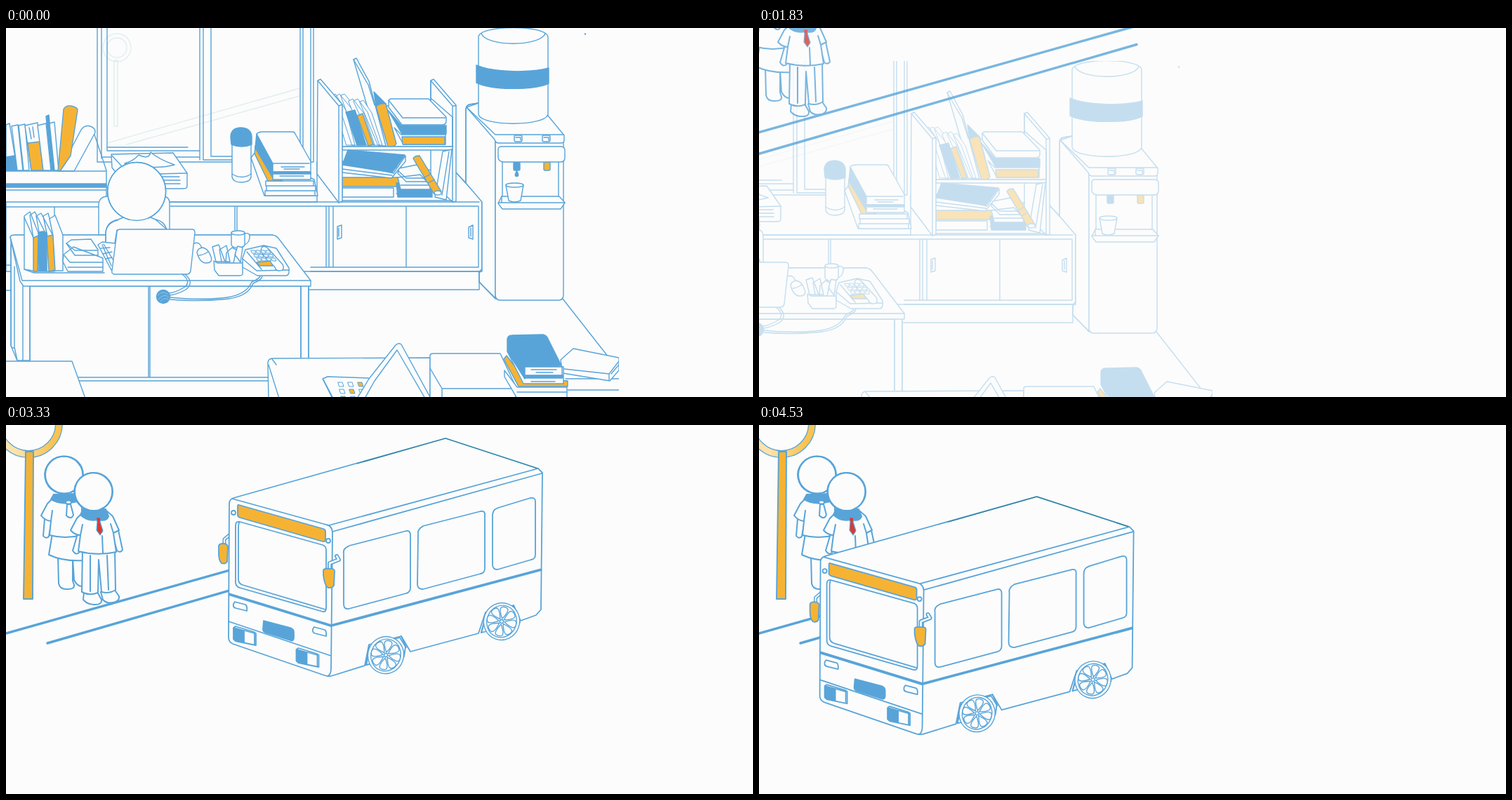
These frames come from a looping animation (1064x526 px, 4730 ms). An HTML page:

```html
<!DOCTYPE html>
<html lang="en">
<head>
<meta charset="utf-8">
<title>Office to bus stop</title>
<style>
html, body { margin: 0; width: 100%; height: 100%; overflow: hidden; background: #fcfcfc; }
svg { display: block; width: 100%; height: 100%; }
path, circle, ellipse, rect { fill: #fcfcfc; stroke: #58a4d9; stroke-width: 1.4; stroke-linejoin: round; stroke-linecap: round; }
.l { fill: none; }
.b { fill: #58a4d9; }
.o { fill: #f6b333; }
.r { fill: #d93a32; }
.pale > * { fill: none; stroke: #e0efee; }
.thin > * { stroke-width: 1; }
.bold > * { stroke-width: 2; }
.bus > * { stroke-width: 1.8; }
.bus > .stripe { stroke-width: 3.8; stroke-linecap: butt; fill: none; }
.road { fill: none; stroke-width: 3.4; }
</style>
</head>
<body>
<svg viewBox="0 0 1064 526">
<defs>
  <clipPath id="page"><rect width="873" height="526"/></clipPath>
  <clipPath id="ahead"><rect id="aheadBox" width="1064" height="526"/></clipPath>
  <linearGradient id="glow"><stop offset=".3" stop-color="#fde2ac"/><stop offset=".9" stop-color="#f8c352"/></linearGradient>
  <g id="wheel"></g>
</defs>

<g id="office"><g clip-path="url(#page)">
  <!-- window -->
  <g class="pale">
    <circle cx="158" cy="28" r="20"/><circle cx="158" cy="28" r="14"/>
    <path d="M154 46V140H159V46ZM144 164 418 86M172 166 418 97"/>
  </g>
  <path class="l" d="M130 0V191M136 0V186M144 0V175M276 0V188M281 0V188M292 0V183M419 0V190M423 0V193M434 0V193M438 0V191M144 170H259M144 175H276M136 184H276M130 191H322M292 183H322M281 188H322M425 191H438"/>
  <!-- counter -->
  <path d="M443 191 640 205 675 243Q678 246 678 251V341Q678 347 672 347H0V248H443Z" stroke="none"/>
  <path class="l" d="M234 248H674M234 254H672M641 206 675 242Q678 246 678 251V341Q678 347 672 347H434M673 254V341H434M674 347V373H432M69 255V294M0 255H133M326 255V288M329 255V288M456 255V341M460 255V341M466 255V341M570 255V341M0 338H8M0 374H8"/>
  <path d="M472 283 478 281V299L472 301ZM474 285V297M665 281 659 284V299L665 301ZM662 285V297"/>

  <!-- far left shelf -->
  <path d="M0 138 5 136 16 203H0Z"/>
  <path class="b" d="M0 184 12 182 15 203H0Z"/>
  <path d="M8 140 17 138 24 203H16ZM18 139 27 137 33 203H25Z"/>
  <path d="M27 139 45 135 53 203H36Z"/><path class="o" d="M31 164 48 162 53 203H36Z"/>
  <path class="l" d="M33 142 36 158M38 141 40 156"/>
  <path d="M45 139 57 136 64 203H53Z"/><path class="b" d="M57 126 61 124 69 203H65Z"/>
  <path d="M62 136 69 134 75 203H69Z"/>
  <path d="M107 145Q112 138 120 140 128 143 127 149L97 204H76Z"/>
  <path class="o" d="M82 116Q84 110 93 111 102 113 102 117L92 182 77 204H74Z"/>
  <path class="l" d="M126 152 143 203M0 204H143V248M0 231H143"/>
  <path class="b" d="M0 222H143V227H0Z" stroke="none"/>

  <!-- tissue box -->
  <path d="M150 180 238 178 258 207V225Q258 229 253 229H175L151 199Z"/>
  <path class="l" d="M151 182 176 209 258 207M176 209V229M222 212H247M222 217H248M222 222H248"/>
  <path d="M169 193Q181 190 189 181 204 188 206 177 217 187 240 195 211 203 169 193Z"/>

  <!-- flask -->
  <path d="M322 164V212Q323 220 336 220 349 219 349 212V164Z"/>
  <path class="l" d="M322 208Q336 217 349 208"/>
  <path class="b" d="M320 156Q320 142 335 142 350 143 350 156V166Q336 172 321 166Z"/>

  <!-- counter book pile -->
  <path d="M349 185 355 177 439 216 444 239H368Z"/>
  <path d="M370 218H438V225H370ZM371 225H441V232H371ZM369 232H440V239H369Z"/>
  <path class="o" d="M355 168 381 210 394 218H373L354 179Z"/>
  <path class="b" d="M357 151 382 193V217L355 171Z"/>
  <path d="M357 151Q360 148 365 148H408Q411 148 412 151L434 190V216H380V193Z"/>
  <path class="l" d="M380 193H432M382 205H432M392 198H425M390 211H424M396 201H418"/>
  <path class="b" d="M380 205H434V208H380Z"/>

  <!-- bookcase -->
  <path d="M605 75 609 73 641 110V247L636 248 605 218Z"/>
  <path class="l" d="M605 75 636 111H641M636 111V248M479 246H636"/>
  <path d="M479 111H605V100L636 127V169H479Z" stroke="none"/>
  <path class="l" d="M605 75V102M636 127V169"/>
  <path d="M495 45 499 43 517 76 541 168H531Z"/><path class="l" d="M495 45 516 81 525 110"/>
  <g class="thin">
    <path d="M464 98 469 94 484 117 497 167H485ZM470 97 475 94 494 117 502 167H493ZM477 96 482 94 499 115 511 167H502Z"/>
    <path d="M488 104 494 101 510 122 525 167H513ZM495 104 501 101 515 120 532 167H524ZM504 105 509 103 521 121 536 167H530Z"/>
  </g>
  <path class="b" d="M484 120 497 117 513 167H500Z"/><path class="o" d="M500 125 508 122 523 166 516 168Z"/>
  <path class="b" d="M524 91 541 108 527 112Z"/>
  <path class="o" d="M527 112Q532 107 541 108L556 165Q553 170 544 169Z"/>
  <path class="b" d="M544 117 563 139H627V151H564Z"/>
  <path d="M545 103Q546 101 549 101H602L627 127V134Q626 138 621 138H564L545 113Z"/>
  <path class="l" d="M545 103 565 128H626"/>
  <path d="M553 142 563 152H626V166H566Z"/><path class="o" d="M564 155H625V166H565Z"/>
  <path d="M479 169H636V174H479Z"/>

  <path d="M622 176 635 173 627 245 611 241Z"/><path class="l" d="M631 176 621 238"/>
  <path d="M479 228H552V241H479Z"/><path class="o" d="M479 213H560V226H479Z"/>
  <path d="M479 190 552 207 569 182V190L549 214 479 206Z"/>
  <path class="b" d="M479 195 487 174 568 181 550 206Z"/>
  <path class="l" d="M479 201 550 210"/>
  <path class="b" d="M556 221H600L607 233V241H558Z"/>
  <path d="M558 213 590 209 604 224V230H562ZM560 200 585 195 600 212V219H570L558 207Z"/>
  <path class="l" d="M558 203 570 214H600M562 224H604M556 236H606"/>
  <path class="o" d="M580 186Q582 182 589 182L620 233Q618 238 610 237Z"/>
  <path d="M596 213 605 208M601 221 610 216" class="l"/>
  <ellipse cx="615" cy="235" rx="5" ry="3"/>
  <path d="M444 75 448 73 479 109V247L474 249 443 208Z"/><path class="l" d="M444 75 474 111V249M474 111 479 109"/>

  <!-- water cooler -->
  <path d="M673 107 660 109Q655 111 655 116V221L678 248V347L674 348V362L697 386V152L772 124Z" stroke="none"/>
  <path class="l" d="M673 107 660 109Q655 111 655 116V220M674 348V362L698 386"/>
  <path d="M697 158V380Q697 388 704 388H787Q794 388 794 380V158Z"/>
  <path d="M656 113 673 107 772 125 795 153V160Q795 164 790 164H702Q697 164 696 159Z"/>
  <path class="l" d="M656 113 697 152H794"/>
  <rect x="724" y="153" width="11" height="9" rx="2"/><rect x="764" y="153" width="11" height="9" rx="2"/>
  <path class="l" d="M726 156H733V160M766 156H773V160M707 190V242M787 190V240"/>
  <rect class="b" x="723" y="191" width="9" height="12" rx="2"/>
  <rect class="o" x="766" y="191" width="9" height="12" rx="2"/>
  <path d="M701 173Q701 169 706 169H791Q796 170 796 174V186Q795 191 790 191H708Q701 190 701 184Z"/>
  <path d="M706 240H788L796 249 790 258H707L701 250Z"/><path class="l" d="M701 249H796M706 240V249"/>
  <path d="M712 224 716 246Q724 250 733 246L737 224Z"/><ellipse cx="724.500" cy="224" rx="12.500" ry="3"/>
  <path id="drop" class="b" d="M727.500-4Q732 4 727.500 4 723 4 727.500-4Z" stroke="none"/>
  <path d="M673 13C673-5 772-5 772 13V122C772 141 673 141 673 122Z"/>
  <path class="l" d="M677 8C685 27 760 27 768 8"/>
  <path class="b" d="M670 53C695 64 748 64 773 57V79C750 90 690 88 670 78Z"/>
  <path class="l" d="M793 386 858 469"/>
  <circle class="b" cx="825" cy="8.500" r=".6" stroke="none"/>

  <!-- desk and sitter -->
  <path d="M132 295V251Q133 241 143 240H223Q233 240 233 250V295Z"/>
  <path d="M7 300V453L16 474H34V368H420V474H431V362L380 295H12Z" stroke="none"/>
  <path class="l" d="M7 309V453Q9 457 12 456M12 340V455L16 474M24 368V474M34 368V474M203 368V498M205 368V498M420 368V470M431 368V470M101 498H374M104 503H374"/>
  <path d="M6 298Q7 295 12 295H378Q385 295 389 301L434 360V368H25L20 361Z"/>
  <path class="l" d="M6 298 23 360H434"/>
  <path d="M142 308V292Q143 276 160 273L174 267H199L213 273 229 287 158 288 153 318Z" stroke="none"/>
  <path class="l" d="M142 308V292Q143 278 159 274M213 273Q225 275 229 287"/>
  <circle cx="186" cy="233" r="41.500" stroke="none"/>
  <path class="l" d="M175 273A41.500 41.500 0 1 1 203 271"/>

  <!-- desk books -->
  <path d="M26 268 34 262 48 297 44 347 26 344ZM34 267 41 262 56 292 58 347H46ZM43 268 50 264 67 296 69 347H57ZM53 268 60 264 69 296V347Z"/>
  <path class="o" d="M39 299 46 296 45 347H39Z"/><path class="b" d="M46 292Q52 288 58 292V346H47Z"/>
  <path class="o" d="M58 297 67 295 70 345 61 347Z"/>
  <path d="M62 272 70 267 81 295V346H70L67 296Z"/><path class="l" d="M26 270 39 299M26 344 40 349H140"/>
  <path d="M82 323 96 312 138 328V347H88L81 333ZM86 307 93 302 121 301 131 316V324H98Z"/>
  <path class="l" d="M86 307 98 317H130M83 324 91 334H138M88 341H138"/>

  <!-- laptop -->
  <path d="M131 309 137 305 156 307V347L150 345Z"/><path class="l" d="M137 309 150 339M139 308 154 333M135 314 148 313M138 322 151 319M142 329 151 327"/>
  <path d="M158 291Q158 287 163 287H266Q269 288 269 292L263 346Q262 351 257 351H154Q150 350 151 346Z"/>
  <path class="l" d="M251 351Q264 361 255 369 242 377 232 378M255 351Q269 363 256 373 243 380 233 381M363 352Q362 357 350 362 342 382 307 385 270 388 234 384M365 354Q364 359 352 364 344 385 307 387 270 390 234 387"/>
  <circle class="b" cx="224" cy="383" r="9.500"/>
  <path class="l" d="M216 381Q224 373 231 380M217 387Q225 377 232 384M220 390Q226 382 232 388" style="stroke:#9fcbe9;stroke-width:.8"/>

  <!-- desk tools -->
  <path class="l" d="M268 307Q276 304 279 314"/>
  <path d="M272 320Q273 314 280 313 288 314 292 326 295 335 285 335 276 335 272 320ZM275 324Q280 324 288 319"/>
  <path d="M340 293Q348 291 347 299 346 308 338 309"/>
  <path d="M321 292V309Q323 314 331 313 339 313 340 309V292Z"/><ellipse cx="330.500" cy="292" rx="9.500" ry="3"/>
  <path d="M294 312 303 309 312 333H299ZM304 316 314 310 319 333H307ZM314 320 322 313 328 316 324 335H313ZM326 323 330 311 337 313 334 334Z"/>
  <path d="M296 332 301 335H337V351Q336 353 333 353H303L297 345Z"/>
  <path d="M337 328 341 316 367 310 385 314 403 342V349Q402 353 398 353H358L337 341Z"/>
  <path class="l" d="M337 329 357 346 403 345M343 319 364 344"/>
  <path d="M364 313Q368 309 373 314L394 337Q398 346 389 346 384 346 383 341L369 326Q361 319 364 313Z"/>
  <g class="keys thin" data-x="349" data-y="317" data-skew="4"></g>
  <path class="o" d="M357 334 376 332 380 339H361Z"/>

  <!-- front desks -->
  <path d="M-2 475H94L113 528H-2Z"/>
  <path d="M373 480Q372 472 379 471L604 470V528H374Z"/><path class="l" d="M374 480 389 528M379 472 385 480"/>
  <path d="M451 500 458 497 516 499 540 528H465Z"/><path class="l" d="M452 501 466 528"/>
  <g class="keys thin" data-x="473" data-y="505" data-skew="2" data-gold="1"></g>
  <path d="M517 500 555 452Q559 448 563 451L605 528H500ZM525 503 557 459 597 528H511Z"/>
  <path d="M604 466Q605 464 609 464H704L726 511V528H604Z"/>
  <path class="l" d="M604 485 621 514H725M621 514V528M797 500H873M800 516H873"/>
  <path d="M790 473 808 457 873 470V488L860 503 793 492Z"/>
  <path class="l" d="M795 486 859 493 873 475M859 493V502M862 493 873 480"/>
  <path d="M710 488 728 512H799V528H728L710 497Z"/><path class="l" d="M728 519H799"/>
  <path class="o" d="M709 472 713 467 737 498 800 503V511H730Z"/>
  <path d="M737 483H794V507H737L715 463Z"/>
  <path class="b" d="M714 443Q715 438 721 438L765 437Q769 438 771 441L791 481 739 484V500L714 461Z"/>
  <path d="M739 483H792V496H739Z"/><path class="l" d="M748 487H784M755 491H779M748 504H782"/>
  <path class="b" d="M738 495H793V499H738Z"/>
</g></g>

<g id="street">
  <g clip-path="url(#ahead)"><path class="road" d="M0 297 597 128.500M59 311 603 153.500"/></g>
  <circle cx="32" cy="-2" r="43.500" class="l" style="stroke-width:11"/>
  <circle cx="32" cy="-2" r="43.500" style="fill:none;stroke:url(#glow);stroke-width:8.500"/>
  <path class="o" d="M28 38H39L38 248H25Z" style="stroke-width:1.900"/>
  <g class="bold">
    <!-- girl -->
    <path d="M74 186 75 226Q77 235 88 234 98 234 97 228L95 222V188ZM95 190 97 221Q102 231 110 230V190Z"/>
    <path d="M66 155 61 185Q82 195 112 193L108 158Z"/>
    <path d="M55 134 53 158Q57 163 61 159L65 136Z"/>
    <path d="M67 104 59 112 50 129Q55 136 64 137L62 157Q84 163 108 157V110L98 103Z"/>
    <path class="l" d="M64 137 66 122"/>
    <path class="b" d="M68 99 64 106Q78 115 102 109L102 98Z"/>
    <path d="M87 113 86 129Q93 136 96 128L92 113Z"/><ellipse cx="89" cy="110" rx="4" ry="2.500"/>
    <ellipse cx="83" cy="71" rx="27" ry="26.500" stroke="none"/>
    <path class="l" d="M76 97A27 26.500 0 1 1 93 95.500"/>
    <!-- boy -->
    <path d="M111 238 110 249Q117 257 127 256 137 256 136 249L130 238ZM135 238 138 249Q143 255 153 253 162 251 161 244L154 234Z"/>
    <path d="M109 178 108 238Q119 244 131 239L132 192 136 238Q147 241 156 235L155 178Z"/>
    <path class="l" d="M120 186V237M144 186 146 235"/>
    <path d="M102 155 95 179Q99 186 104 182L110 158ZM151 154 158 179Q163 183 166 178L160 150Z"/>
    <path d="M108 126 101 133 92 150Q98 157 106 157L103 180Q130 187 157 181L153 154 161 150 152 130 144 123Z"/>
    <path class="l" d="M106 157 109 142M153 154 149 141M137 158 138 183"/>
    <path class="b" d="M110 120 106 128Q116 138 131 135 144 138 146 130L142 120Z"/>
    <path class="r" d="M128 132H135L134 138 138 151 134 157 129 150 130 138Z" style="stroke-width:1.200"/>
    <ellipse cx="125" cy="95" rx="27" ry="27" stroke="none"/>
    <path class="l" d="M118 121.500A27 27 0 1 1 135 120"/>
  </g>
</g>

<g id="bus" class="bus">
  <path class="l" d="M318 157 311 163V171" style="stroke-width:5"/><path class="l" d="M318 157 311 163V171" style="stroke:#fcfcfc;stroke-width:2"/>
  <path class="o" d="M303 172Q304 169 309 169 315 169 316 173L315 195Q312 199 307 197 303 193 303 184Z"/>
  <path d="M318 112Q318 106 324 104L626 19 758 62 764 68 762 263 755 271 733 279 723 257 683 267 673 297 576 323 563 301 517 313 511 343 466 357Q460 359 454 357L323 312Q317 309 317 303Z"/>
  <path class="l" d="M500 55 626 19 757 62" style="stroke:#32809a;stroke-width:1.300"/>
  <path class="l" d="M322 105 456 142Q465 144 465 153L463 347Q463 356 458 358M460 143 758 62M465 152 763 69M317 280 463 329"/>
  <path class="o" d="M332 114 452 148Q455 149 455 152V163Q455 167 451 166L333 132Q330 131 330 128V116Q330 113 332 114Z"/>
  <path d="M333 138 451 171Q456 173 456 178V261Q456 267 451 266L333 232Q328 231 327 225V143Q327 137 333 138Z"/>
  <path class="l" d="M332 139Q331 142 331 147V220Q331 226 337 228L455 263"/>
  <circle cx="324" cy="125" r="3"/><circle cx="459" cy="165" r="3"/>
  <path class="stripe" d="M317 241 463 286 763 206"/>
  <path id="pill" d="M326 252 341 256Q344 258 343 265L327 261Q323 260 324 255Z"/>
  <use href="#pill" x="113" y="36"/>
  <path class="b" d="M367 279 405 289Q410 291 410 295V304Q409 309 405 307L370 296Q366 295 366 291Z"/>
  <g id="lamp" class="bus"><path d="M324 289 327 287 353 295 356 297V314L327 308 324 305Z"/><path class="b" d="M325 289 339 293V310L325 306Z"/><path class="l" d="M340 293 354 297V313"/></g>
  <use href="#lamp" x="89.500" y="31"/>
  <path d="M481 183Q480 178 484 175L489 172 570 151Q576 150 576 157V233Q575 239 570 240L488 262Q481 263 481 255Z"/>
  <path d="M587 156Q586 151 590 147L594 144 676 123Q683 122 682 129V204Q682 211 676 212L594 234Q586 234 586 227Z"/>
  <path d="M693 129Q693 123 697 120L701 118 747 104Q754 103 754 109V185Q754 191 748 192L700 206Q693 206 693 199Z"/>
  <path d="M513 342 518 315 561 303 569 316 567 330ZM677 296 684 269 722 258 730 275 732 282Z" stroke="none"/>
  <path class="l" d="M513 342 519 315M677 296 685 268M563 301 570 317M723 257 731 275"/>
  <use href="#wheel" x="541" y="328"/><use href="#wheel" x="706" y="280"/>
  <path class="l" d="M461 206V197L474 192 471 187" style="stroke-width:6"/><path class="l" d="M461 206V197L474 192 471 187" style="stroke:#fcfcfc;stroke-width:2.600"/>
  <path class="o" d="M452 207Q453 204 460 205 468 204 468 208L467 229Q464 233 459 232 454 230 452 214Z"/>
</g>
</svg>

<script>
const $ = id => document.getElementById(id);
const LOOP = 4730, PAN_START = 1080, PAN_STEP = 250, PAN_STEPS = 6;
const BUS_START = 2330, BUS_STEP = 200, BUS_MIDDLE = 540;

function buildWheel() {
  let parts = '<ellipse rx="25.500" ry="26.500" transform="rotate(20)"/><ellipse rx="21" ry="23" transform="rotate(20)"/>';
  for (let a = 0; a < 360; a += 45) {
    parts += `<path transform="rotate(${a + 12})" d="M0-4Q-8-17-4-20 0-22 4-20 8-17 0-4Z"/>`;
  }
  $('wheel').innerHTML = parts + '<circle r="2.500"/>';
}

function buildKeys(group) {
  const { x, y, skew, gold } = group.dataset;
  let parts = '';
  for (let row = 0; row < 3; row++) {
    for (let col = 0; col < (gold ? 3 : 4); col++) {
      const kx = +x + col * (gold ? 14 : 7) + row * skew;
      const ky = +y + row * (gold ? 10 : 5.5);
      const fill = gold && (row + col) % 2 === 0 && row + col > 0 ? 'o' : '';
      parts += `<path class="${fill}" d="M${kx} ${ky}h${gold ? 6 : 5}l2 ${gold ? 6 : 4}h${gold ? -6 : -5}Z"/>`;
    }
  }
  group.innerHTML = parts;
}

function place(el, x, y) {
  el.setAttribute('transform', `translate(${x} ${y})`);
}

function show(el, on) {
  el.style.display = on ? '' : 'none';
}

function draw(t) {
  const pan = t < PAN_START ? 0 : Math.min(PAN_STEPS, 1 + Math.floor((t - PAN_START) / PAN_STEP));
  const left = PAN_STEPS - pan;

  show($('office'), left > 0);
  place($('office'), Math.round(-56.85 * pan), Math.round(11.8 * pan));
  $('office').style.opacity = left / PAN_STEPS;

  show($('street'), pan > 0);
  place($('street'), -32.5 * left, -65 * left);
  $('street').style.opacity = Math.min(1, pan / (PAN_STEPS - 1));

  const fall = Math.floor(t / 120);
  show($('drop'), fall < 7);
  place($('drop'), 0, 207.5 + 3.1 * fall);

  const riding = t >= BUS_START;
  const ride = Math.floor((t - BUS_START) / BUS_STEP) - 5;
  const busX = -38.4 * ride;
  show($('bus'), riding);
  place($('bus'), busX, 13.85 * ride);
  // The road is only drawn ahead of the bus.
  $('aheadBox').setAttribute('width', riding ? BUS_MIDDLE + busX : 1064);
}

function tick() {
  draw(performance.now() % LOOP);
  requestAnimationFrame(tick);
}

buildWheel();
document.querySelectorAll('.keys').forEach(buildKeys);
tick();
</script>
</body>
</html>
```
